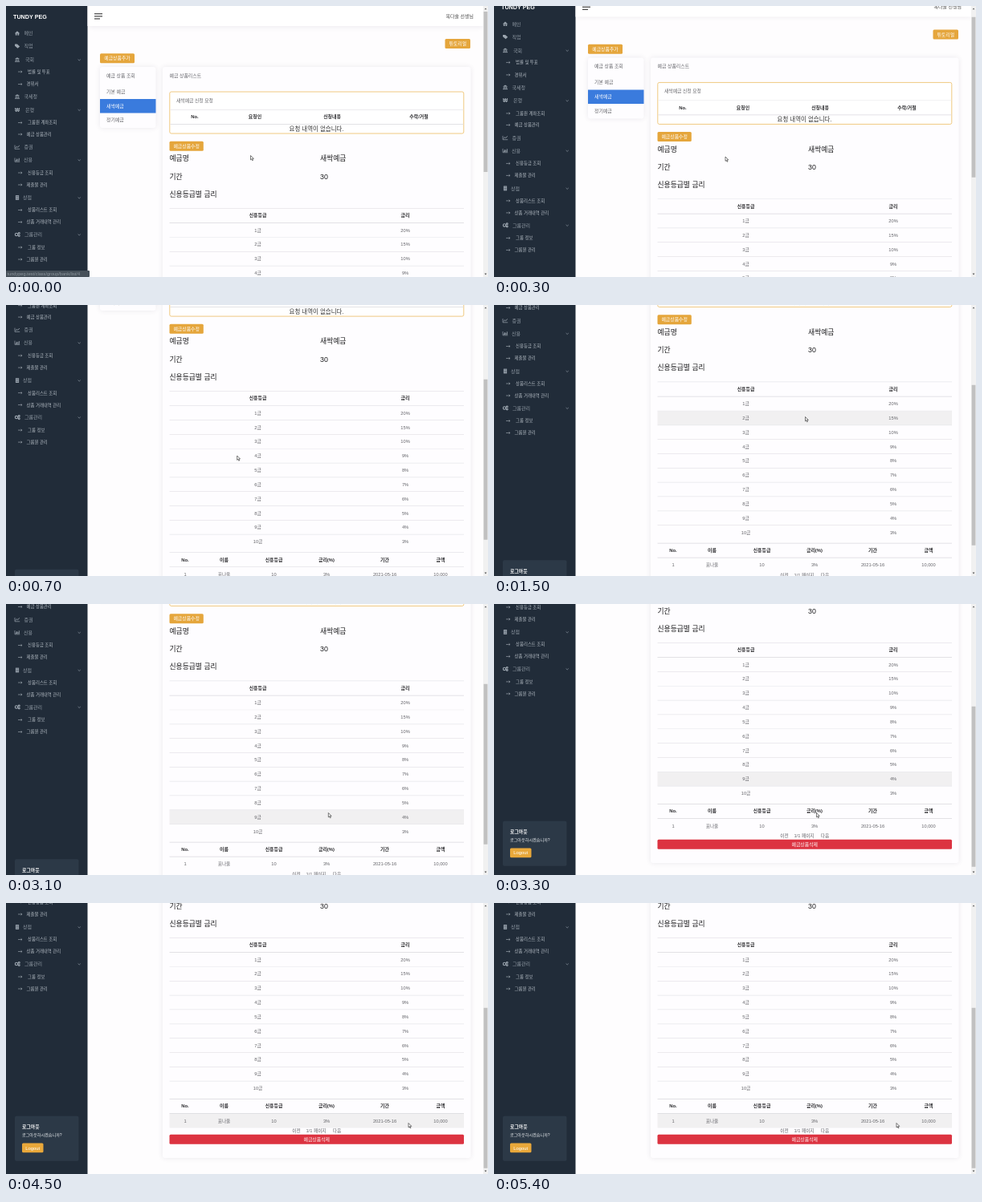
An HTML page with a canvas for the animation above (5.5 s loop, 600 by 338 pixels).

```html
<!DOCTYPE html>
<html lang="ko">
<head>
<meta charset="utf-8">
<style>
html, body { margin: 0; width: 100%; height: 100%; overflow: hidden; background: #fff; }
canvas { display: block; width: 600px; height: 338px; }
</style>
</head>
<body>
<canvas id="stage" width="600" height="338"></canvas>
<script>
const ctx = document.getElementById('stage').getContext('2d');
const LOOP = 5500, STEP = 100;
const FONT = '"Liberation Sans", "Noto Sans CJK KR", "Noto Sans CJK", sans-serif';
const ORANGE = '#e5a63c', INK = '#2b2b2e', GRAY = '#626267', LINE = '#e6e5e9';
const ROW_TOP = 270.6, ROW_H = 17.83, LAST_ROW = 471.6;

// [kind, label, x, y, hasChevron]; kind "sub" is an indented link
const MENU = [
  ['home', '메인', 22.5, 34], ['tag', '직업', 22.5, 50],
  ['hall', '국회', 24, 67, true], ['sub', '법률 및 투표', 27, 82], ['sub', '경위서', 25.5, 97.5],
  ['hall', '국세청', 22.5, 113],
  ['won', '은행', 24, 129.5, true], ['sub', '그룹원 계좌조회', 27, 145.5], ['sub', '예금 상품관리', 25.5, 160],
  ['line', '증권', 22.5, 176],
  ['bars', '신용', 22, 192, true], ['sub', '신용등급 조회', 27, 208], ['sub', '제출물 관리', 25.5, 223],
  ['shop', '상점', 21, 239, true], ['sub', '상품리스트 조회', 27, 254.5], ['sub', '상품 거래내역 관리', 25.5, 269.5],
  ['gear', '그룹관리', 23, 285, true], ['sub', '그룹 정보', 27, 301], ['sub', '그룹원 관리', 25.5, 316]
];
const RATES = [20, 15, 10, 9, 8, 7, 6, 5, 4, 3];
const COLUMNS = [223, 271.5, 333.5, 399, 471.5, 541];

// Pointer keys: time, x, y
const POINTER = [
  [0, 304.5, 186.5], [300, 288, 188], [900, 287.5, 188], [1500, 387.5, 139.5],
  [2000, 396, 214], [2600, 401, 260.5], [3400, 401.5, 260.5], [3800, 405, 274],
  [4400, 486, 277], [4500, 501, 274.5], [LOOP, 501, 274.5]
];

const clamp = v => Math.min(1, Math.max(0, v));

function scrollAt(t) {
  const a = clamp((t - 200) / 600), b = clamp((t - 3100) / 300);
  return 156.5 * a * a * (3 - 2 * a) + 52.5 * (1 - (1 - b) ** 2.15);
}

function pointerAt(t) {
  const i = POINTER.findIndex(key => key[0] > t);
  const [t0, x0, y0] = POINTER[i - 1], [t1, x1, y1] = POINTER[i];
  const k = (t - t0) / (t1 - t0);
  return [x0 + (x1 - x0) * k, y0 + (y1 - y0) * k];
}

// Document y of the hovered row; it stays put while the page scrolls
function hoverAt(t) {
  if (t > 200 && t < 900) t = 200;
  if (t > 3100 && t < 3500) t = 3100;
  const y = pointerAt(t)[1] + scrollAt(t);
  const row = Math.floor((y - ROW_TOP) / ROW_H);
  if (row >= 0 && row < RATES.length) return ROW_TOP + row * ROW_H;
  return y >= LAST_ROW && y < LAST_ROW + ROW_H ? LAST_ROW : null;
}

function text(str, x, y, size = 5.9, color = GRAY, align = 'left', weight = 400) {
  ctx.font = `${weight} ${size}px ${FONT}`;
  ctx.textAlign = align;
  ctx.fillStyle = color;
  ctx.fillText(str, x, y + size * 0.37);
}

const heading = (str, x, y) => text(str, x, y, 5.9, INK, 'center', 700);
const cell = (str, x, y) => text(str, x, y, 5.7, GRAY, 'center');

function box(x, y, w, h, color, radius = 0) {
  ctx.fillStyle = color;
  ctx.beginPath();
  ctx.roundRect(x, y, w, h, radius);
  ctx.fill();
}

function card(x, y, w, h, color) {
  ctx.save();
  ctx.shadowColor = 'rgba(60,50,80,.1)';
  ctx.shadowBlur = 6;
  box(x, y, w, h, color, 3);
  ctx.restore();
}

function button(label, x, y, w, h = 12, color = ORANGE) {
  box(x, y, w, h, color, 1.5);
  text(label, x + w / 2, y + h / 2, 5.9, '#fff', 'center');
}

const rule = (x, y, w, color = LINE) => box(x, y - 0.3, w, 0.7, color);

function stroke(points, color, width = 0.7) {
  ctx.beginPath();
  points.forEach(([x, y]) => ctx.lineTo(x, y));
  ctx.strokeStyle = color;
  ctx.lineWidth = width;
  ctx.stroke();
}

function polygon(points, color) {
  ctx.beginPath();
  points.forEach(([x, y]) => ctx.lineTo(x, y));
  ctx.closePath();
  ctx.fillStyle = color;
  ctx.fill();
}

function ring(x, y, r, color) {
  ctx.beginPath();
  ctx.arc(x, y, r, 0, 7);
  ctx.strokeStyle = color;
  ctx.lineWidth = 1.1;
  ctx.stroke();
}

const ICONS = {
  home(c) {
    polygon([[-3.2, 0.2], [0, -2.8], [3.2, 0.2]], c);
    box(-2.2, 0, 1.7, 2.6, c);
    box(0.5, 0, 1.7, 2.6, c);
  },
  tag(c) { polygon([[-3, -2.5], [0, -2.5], [3.2, 0.4], [0.6, 2.8], [-3, -0.2]], c); },
  hall(c) {
    polygon([[-3, -1], [0, -2.8], [3, -1]], c);
    for (const x of [-2.2, -0.5, 1.2]) box(x, -0.6, 1, 2, c);
    box(-3, 1.8, 6, 0.9, c);
  },
  won(c) { text('₩', 0, 0, 6.5, c, 'center', 700); },
  line(c) {
    stroke([[-3, -2.5], [-3, 2.3], [3.2, 2.3]], c);
    stroke([[-2, 1], [-0.5, -0.8], [0.6, 0.2], [2.8, -2]], c, 0.9);
  },
  bars(c) {
    stroke([[-3, -2.5], [-3, 2.3], [3.2, 2.3]], c);
    [1.5, 3, 2.2, 3.8].forEach((h, i) => box(-2.1 + i * 1.3, 1.6 - h, 0.9, h, c));
  },
  shop(c) {
    box(-2.1, -2.9, 4.2, 5.8, c);
    for (const y of [-1.9, -0.4, 1.1]) {
      box(-1.2, y, 0.8, 0.7, '#212c39');
      box(0.5, y, 0.8, 0.7, '#212c39');
    }
  },
  gear(c) {
    ring(-1, 0, 1.7, c);
    ring(2.3, -1.6, 0.9, c);
    ring(2.3, 1.6, 0.9, c);
  }
};

function drawSidebar() {
  text('TUNDY PEG', 9, 13, 7.2, '#fff', 'left', 700);
  for (const [kind, label, x, y, chevron] of MENU) {
    if (kind === 'sub') {
      stroke([[15, y], [20, y]], '#a9b2bb', 0.6);
      stroke([[18.6, y - 1.2], [20, y], [18.6, y + 1.2]], '#a9b2bb', 0.6);
      text(label, x, y, 5.4, '#b4bcc4');
      continue;
    }
    ctx.save();
    ctx.translate(14, y);
    ICONS[kind]('#9ba5af');
    ctx.restore();
    text(label, x, y, 6, '#949ea8');
    if (chevron) stroke([[89.6, y - 0.5], [91.2, y + 1], [92.8, y - 0.5]], '#8d97a2');
  }
  box(11, 474.7, 79.5, 56, '#2c3947', 2);
  text('로그아웃', 20, 488, 5.9, '#fff', 'left', 700);
  text('로그아웃하시겠습니까?', 20, 498.5, 5.1, '#e8ebee');
  button('Logout', 20, 508.5, 26.5, 11.7, '#e9a83a');
}

function drawHeader() {
  ctx.save();
  ctx.shadowColor = 'rgba(60,50,80,.12)';
  ctx.shadowBlur = 7;
  box(101.5, 0, 493, 25, '#fff');
  ctx.restore();
  [10, 10, 7].forEach((w, i) => box(110, 9.2 + i * 3.1, w, 1.1, '#333'));
  text('옥다솔 선생님', 547.5, 12.5, 5.95, '#444');
  button('튜토리얼', 546.5, 41, 31.5);
  button('예금상품추가', 117, 59.3, 43);
}

function drawProducts() {
  card(117, 76, 69.5, 76, '#fefdff');
  text('예금 상품 조회', 125, 86.5);
  text('기본 예금', 125, 106.5);
  box(117, 116, 69.5, 17.5, '#3a7bdd');
  text('새싹예금', 125, 124.8, 5.9, '#fff');
  text('정기예금', 125, 142);
}

function drawRequests() {
  box(203.8, 107, 366, 52, '#fff', 2);
  ctx.strokeStyle = '#efc373';
  ctx.lineWidth = 0.9;
  ctx.stroke();
  text('새싹예금 신청 요청', 212, 117.5, 5.8);
  rule(204.5, 129.3, 365);
  heading('No.', 235, 138.3);
  heading('요청인', 310, 138.3);
  heading('신청내용', 406, 138.3);
  heading('수락/거절', 514, 138.3);
  rule(204.5, 147.5, 365, '#d9d8dd');
  text('요청 내역이 없습니다.', 386.5, 153, 7.45, '#333', 'center');
}

function drawDetails(hover) {
  card(195, 76, 383.5, 451, '#fefdff');
  text('예금 상품리스트', 203.5, 86.5);
  drawRequests();
  button('예금상품수정', 203.5, 168.7, 42.3);
  text('예금명', 203.5, 190, 8.8, '#1c1c1e');
  text('새싹예금', 391, 190, 8.8, '#1c1c1e');
  text('기간', 203.5, 212.5, 8.8, '#1c1c1e');
  text('30', 391, 212.5, 8.8, '#1c1c1e');
  text('신용등급별 금리', 203.5, 234.5, 8.8, '#1c1c1e');

  if (hover !== null) box(203.5, hover, 366.5, ROW_H, '#f1f0f1');
  rule(203.5, 252.3, 366.5);
  heading('신용등급', 313.5, 261);
  heading('금리', 497, 261);
  RATES.forEach((rate, i) => {
    const top = ROW_TOP + i * ROW_H;
    rule(203.5, top, 366.5, i ? LINE : '#d9d8dd');
    cell(`${i + 1}급`, 313.5, top + 8.9);
    cell(`${rate}%`, 497, top + 8.9);
  });

  rule(203.5, 453.6, 366.5, '#d9d8dd');
  rule(203.5, LAST_ROW, 366.5, '#d9d8dd');
  ['No.', '이름', '신용등급', '금리(%)', '기간', '금액'].forEach((s, i) => heading(s, COLUMNS[i], 462.3));
  ['1', '표나울', '10', '3%', '2021-05-16', '10,000'].forEach((s, i) => cell(s, COLUMNS[i], 480.6));
  cell('이전', 361.5, 493);
  cell('1/1 페이지', 386, 493);
  cell('다음', 412, 493);
  button('예금상품삭제', 203.5, 497.7, 366.5, 12, '#dc3341');
}

function drawScrollbar(scroll) {
  box(594, 0, 6, 338, '#f1f1f1');
  box(594.6, 7 + scroll * 0.592, 4.8, 200, '#c1c1c1');
  polygon([[595.6, 4.2], [597, 2.4], [598.4, 4.2]], '#555');
  polygon([[595.6, 333.6], [597, 335.4], [598.4, 333.6]], '#555');
}

function drawPointer([x, y]) {
  ctx.save();
  ctx.translate(x, y);
  const shape = [[0, 0], [0, 5.4], [1.2, 4.3], [2.1, 6.3], [3, 5.9], [2.1, 3.9], [3.8, 3.9]];
  polygon(shape, '#fff');
  stroke([...shape, [0, 0]], '#222', 0.6);
  ctx.restore();
}

function draw(t) {
  const scroll = scrollAt(t);
  box(0, 0, 600, 338, '#fefdfe');
  box(0, 0, 101.5, 338, '#212c39');
  ctx.save();
  ctx.translate(0, -scroll);
  drawHeader();
  drawProducts();
  drawDetails(hoverAt(t));
  drawSidebar();
  ctx.restore();
  drawScrollbar(scroll);
  if (t < 100) {
    box(0, 330, 104, 8, '#465059', 1);
    text('tundypeg.test/class/group/bank/list/4', 1.5, 334, 5.6, '#8e979f');
  }
  drawPointer(pointerAt(t));
}

function frame() {
  draw(Math.floor(performance.now() % LOOP / STEP) * STEP);
  requestAnimationFrame(frame);
}
frame();
</script>
</body>
</html>
```
